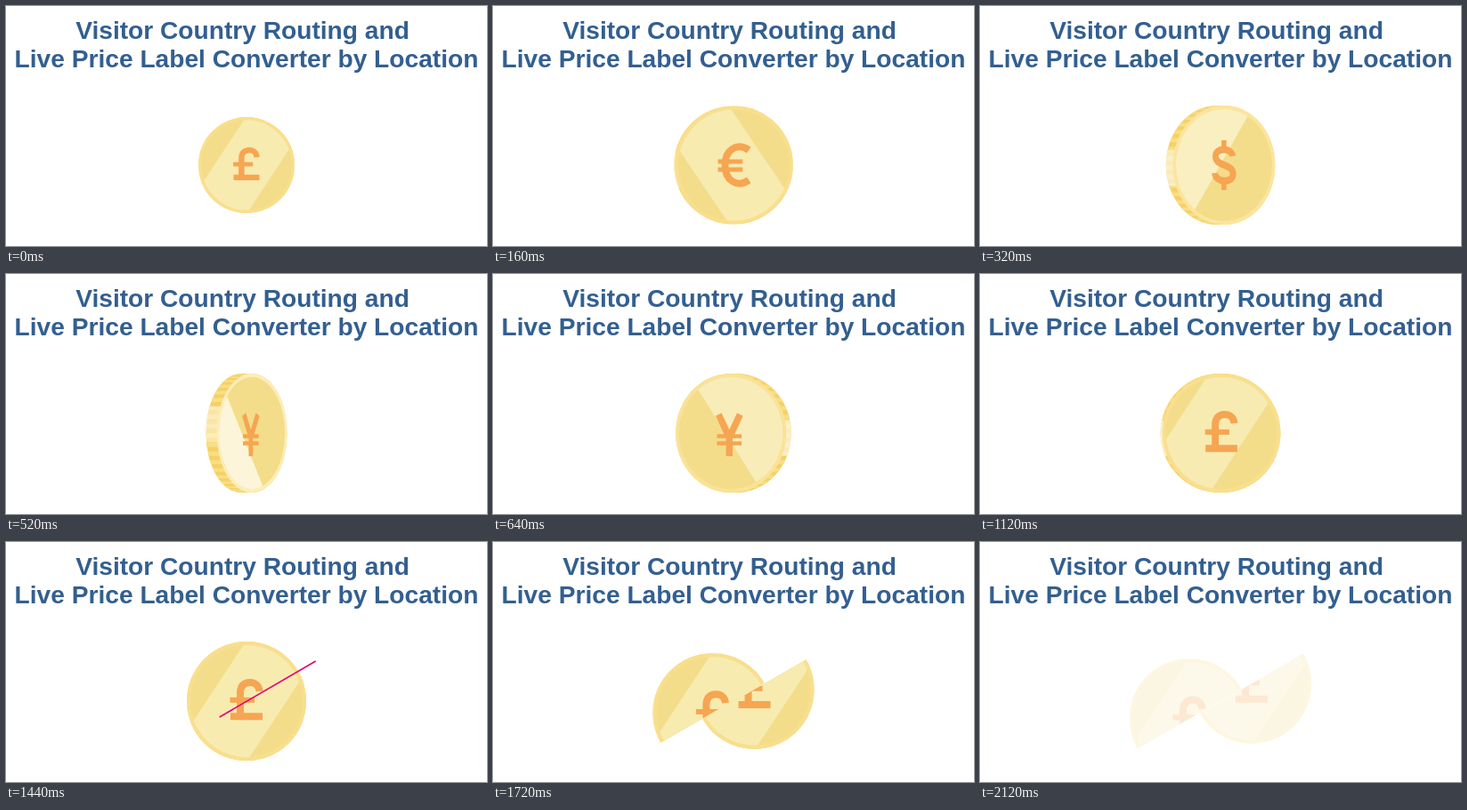
An HTML page for the animation above (2.16 s loop, 540x270 px).

```html
<!DOCTYPE html>
<html lang="en">
<head>
<meta charset="utf-8">
<title>Currency coin</title>
<style>
  html, body { margin: 0; width: 100%; height: 100%; overflow: hidden; background: #fff; }
  svg { display: block; width: 540px; height: 270px; }
  text { font: bold 28.15px "Liberation Sans", Arial, sans-serif; fill: #335f90; text-anchor: middle; }
  .symbol { fill: none; stroke: #f6a552; stroke-width: 8; display: none; }
</style>
</head>
<body>
<svg viewBox="0 0 540 270">
  <defs>
    <clipPath id="faceClip"><circle r="63"/></clipPath>
    <clipPath id="rimClip"><path id="rimOutline"/></clipPath>
    <clipPath id="upperHalf"><rect x="-100" y="-100" width="200" height="100" transform="rotate(-30)"/></clipPath>
    <clipPath id="lowerHalf"><rect x="-100" width="200" height="100" transform="rotate(-30)"/></clipPath>
    <g id="coin">
      <g clip-path="url(#rimClip)">
        <rect x="-80" y="-70" width="160" height="140" fill="#f5d165"/>
        <path id="ridges" fill="#f8de86"/>
        <rect id="gleam" x="-80" width="160" height="40" fill="#fff"/>
      </g>
      <g id="face">
        <circle id="ring" r="67"/>
        <circle r="63" fill="#f3dd8a"/>
        <g clip-path="url(#faceClip)"><rect id="sheen" y="-70" height="140"/></g>
        <g class="symbol"><path d="M14.5-11C14-17 10-21 4-21C-4-21-7-16-7-9V17M-18 17.2H18"/><path d="M-18.5-1.2H9" stroke-width="6"/></g>
        <g class="symbol"><path d="M-15-21L-2 5L11-21M-2 2V26"/><path d="M-17 3.5H13M-17 11.5H13" stroke-width="4.5"/></g>
        <g class="symbol"><path d="M11.5-10C10-20-11-20-11-10C-11 2 12-2 12 10C12 21-11 20-12 9"/><path d="M0-28V-18M0 18V28" stroke-width="6.5"/></g>
        <g class="symbol"><path d="M17-17C4-26-10-18-10 0S4 26 17 17"/><path d="M-18-4H10M-18 5H10" stroke-width="5"/></g>
      </g>
    </g>
  </defs>
  <text x="265.5" y="37">Visitor Country Routing and</text>
  <text x="270" y="69">Live Price Label Converter by Location</text>
  <g id="stage" transform="translate(270 179)">
    <use id="upper" href="#coin"/>
    <use id="lower" href="#coin" clip-path="url(#lowerHalf)"/>
  </g>
  <line id="slash" stroke="#e2007a" stroke-width="1.7"/>
</svg>
<script>
const LOOP = 2160, STEP = 40, R = 67, THICKNESS = 15;
const $ = id => document.getElementById(id);
const set = (el, attrs) => { for (const key in attrs) el.setAttribute(key, attrs[key]); };
const clamp = v => Math.max(0, Math.min(1, v));
const progress = (t, from, to) => clamp((t - from) / (to - from));
const easeOut = p => 1 - (1 - p) ** 2;
const mix = (a, b, p) => a + (b - a) * p;
const mixColor = (a, b, p) => `rgb(${a.map((v, i) => Math.round(mix(v, b[i], p)))})`;
const symbols = [...document.querySelectorAll('.symbol')];

// The spin slows down evenly; the square of this value is the share of two turns left.
const spinKeys = [[0, 1], [320, .737], [520, .57], [800, .332], [1120, .105], [1260, 0]];
function turnLeft(t) {
  for (let i = 1; i < spinKeys.length; i++) {
    const [t0, v0] = spinKeys[i - 1], [t1, v1] = spinKeys[i];
    if (t <= t1) return 720 * mix(v0, v1, (t - t0) / (t1 - t0)) ** 2;
  }
  return 0;
}

// Ridges evenly spaced around the rim, seen from the side.
let ridges = '';
for (let a = -90; a < 90; a += 9) {
  const y = deg => R * Math.sin(deg * Math.PI / 180);
  ridges += `M-80 ${y(a)}H80V${y(a + 4.5)}H-80Z`;
}
set($('ridges'), { d: ridges });

function drawCoin(left) {
  const side = Math.round(left / 180);
  const angle = (left - side * 180) * Math.PI / 180;
  const cos = Math.max(.01, Math.cos(angle)), sin = Math.sin(angle);
  const rx = R * cos, half = THICKNESS / 2 * Math.abs(sin);
  const tilt = sin * sin;

  set($('rimOutline'), { d: `M${-half} ${-R}A${rx} ${R} 0 0 0 ${-half} ${R}H${half}A${rx} ${R} 0 0 0 ${half} ${-R}Z` });
  set($('gleam'), { y: -14 - 37 * tilt * tilt, opacity: mix(.62, .32, tilt) });
  set($('face'), { transform: `translate(${THICKNESS / 2 * sin}) scale(${cos} 1)` });
  set($('ring'), { fill: mixColor([249, 223, 141], [255, 245, 206], tilt) });

  const width = 2 * (4 + 41 * cos);
  set($('sheen'), {
    x: -50 * Math.sin(2 * angle) - width / 2, width,
    transform: `skewX(${side % 2 ? 34 : -33.4})`,
    fill: mixColor([247, 235, 176], [255, 250, 240], tilt)
  });
  symbols.forEach((el, i) => el.style.display = i === side % 4 ? 'inline' : 'none');
}

function drawSlash(t) {
  const head = progress(t, 1240, 1560), tail = progress(t, 1380, 1700);
  const x = p => mix(394, 147, p), y = p => mix(107, 251, p);
  set($('slash'), {
    x1: x(tail), y1: y(tail), x2: x(head), y2: y(head),
    visibility: head > tail ? 'visible' : 'hidden'
  });
}

function drawHalves(t) {
  const slide = easeOut(progress(t, 1480, 2040));
  const dx = 35 * slide, dy = 19.5 * slide;
  const cut = slide > 0;
  set($('upper'), { transform: `translate(${-dx} ${dy})`, 'clip-path': cut ? 'url(#upperHalf)' : 'none' });
  set($('lower'), { transform: `translate(${dx} ${-dy})`, visibility: cut ? 'visible' : 'hidden' });
  const scale = mix(.805, 1, easeOut(progress(t, 0, 200)));
  set($('stage'), {
    transform: `translate(270 179) scale(${scale})`,
    opacity: 1 - progress(t, 1880, 2200)
  });
}

function draw(t) {
  drawCoin(turnLeft(t));
  drawHalves(t);
  drawSlash(t);
}

const start = performance.now();
function tick() {
  const t = (performance.now() - start) % LOOP;
  draw(Math.floor(t / STEP) * STEP);
  requestAnimationFrame(tick);
}
tick();
</script>
</body>
</html>
```
